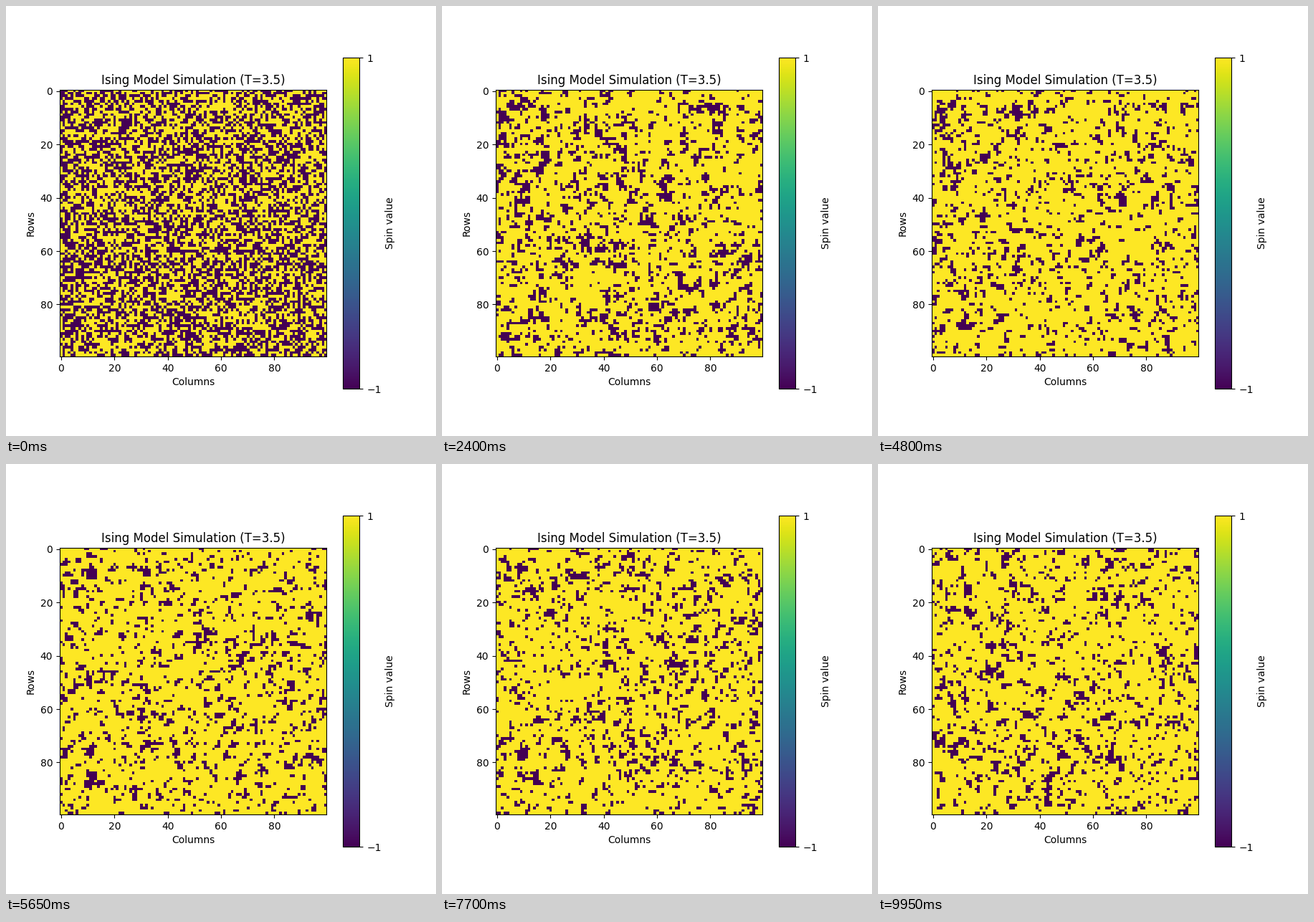
Recreate the animation shown at these times as a matplotlib script. Size 600x600 px, loop 10 s.

```python
import numpy as np
import matplotlib.pyplot as plt
from matplotlib.animation import FuncAnimation

SIZE = 100
FRAMES = 200
INTERVAL = 50
TEMPERATURE = 3.5
FIELD = 0.6
PICK_RATE = 0.1  # share of sites tried per frame

rng = np.random.default_rng(7)
rows, cols = np.indices((SIZE, SIZE))
SUBLATTICES = [(rows + cols) % 2 == k for k in (0, 1)]


def neighbour_sum(spins):
    return sum(np.roll(spins, shift, axis) for shift in (1, -1) for axis in (0, 1))


def metropolis_step(spins):
    """Try random flips, one checkerboard sublattice after the other."""
    spins = spins.copy()
    for sublattice in SUBLATTICES:
        cost = 2 * spins * (neighbour_sum(spins) + FIELD)
        accept = rng.random(spins.shape) < np.exp(-cost / TEMPERATURE)
        picked = rng.random(spins.shape) < PICK_RATE
        spins[sublattice & picked & accept] *= -1
    return spins


def simulate():
    spins = np.where(rng.random((SIZE, SIZE)) < 0.52, 1, -1)
    history = [spins]
    for _ in range(FRAMES - 1):
        history.append(metropolis_step(history[-1]))
    return history


history = simulate()

fig, ax = plt.subplots(figsize=(6, 6), dpi=100)
image = ax.imshow(history[0], cmap="viridis", vmin=-1, vmax=1)
fig.colorbar(image, ax=ax, ticks=[-1, 1], label="Spin value")
ax.set_title(f"Ising Model Simulation (T={TEMPERATURE})")
ax.set_xlabel("Columns")
ax.set_ylabel("Rows")


def update(frame):
    image.set_data(history[frame])
    return [image]


anim = FuncAnimation(fig, update, frames=FRAMES, interval=INTERVAL, repeat=True)
plt.show()
```
